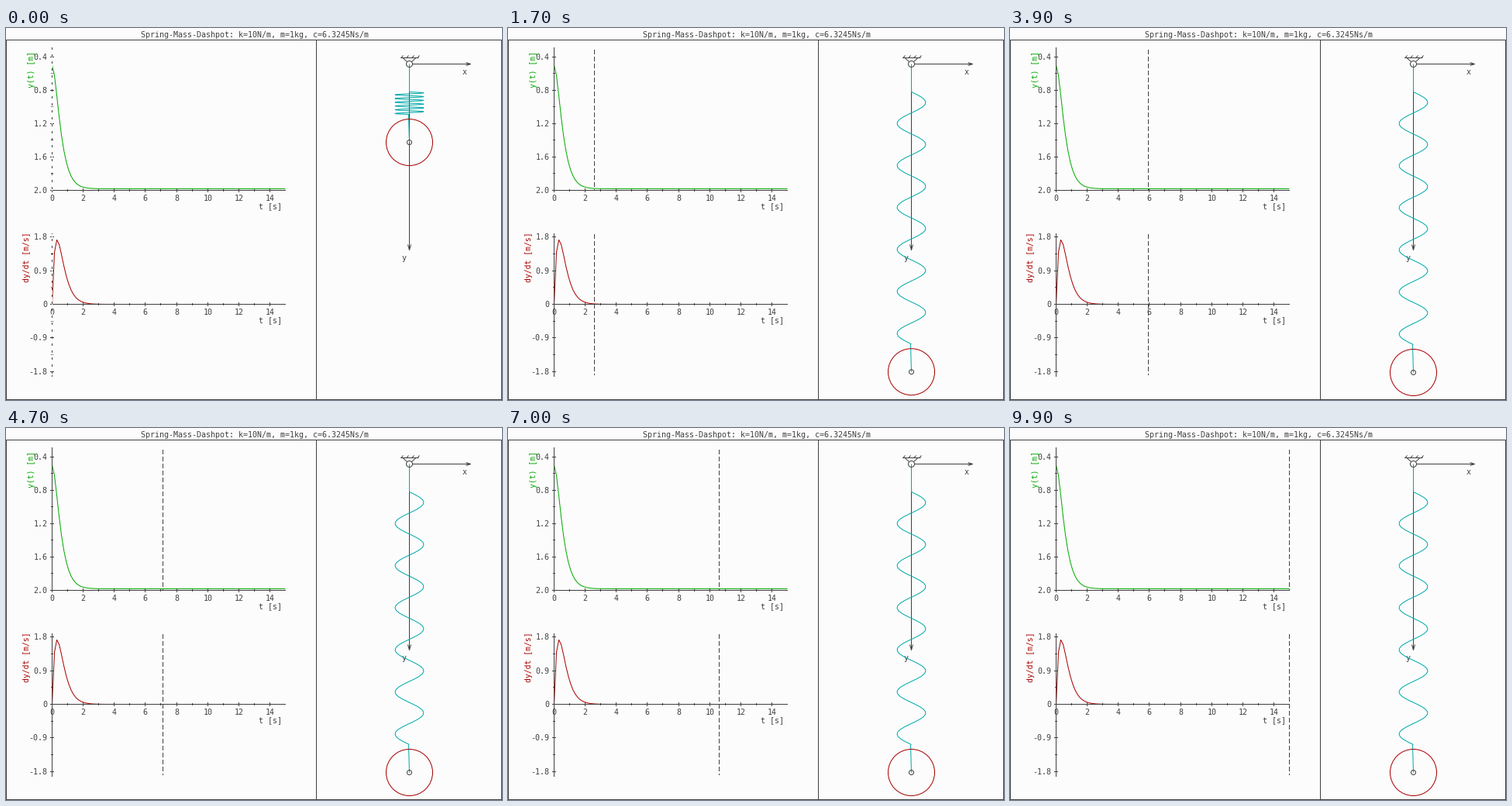
Recreate the animation shown at these times as a matplotlib script. Size 640 px wide and 480 px high, loop 10000 ms.

```python
import numpy as np
import matplotlib.pyplot as plt
from matplotlib.animation import FuncAnimation
from matplotlib.patches import Circle

W, H, DPI = 640, 480, 80
PX = 72 / DPI                       # one pixel in points
FRAMES, INTERVAL, T_END = 100, 100, 15.0

BG, INK, GREEN, RED, CYAN = "#fcfcfc", "#404040", "#00a800", "#a80000", "#00a8a8"

plt.rcParams.update({
    "font.family": "DejaVu Sans Mono",
    "toolbar": "None",
    "path.snap": False,             # coordinates are already on pixel centres
})

# Critically damped oscillator
M, K, G, L0, Y0 = 1.0, 10.0, 9.81, 1.0, 0.5
OMEGA = np.sqrt(K / M)
Y_END = L0 + M * G / K


def position(t):
    return Y_END + (Y0 - Y_END) * (1 + OMEGA * t) * np.exp(-OMEGA * t)


def velocity(t):
    return (Y_END - Y0) * OMEGA**2 * t * np.exp(-OMEGA * t)


fig = plt.figure(figsize=(W / DPI, H / DPI), dpi=DPI, facecolor=BG)
ax = fig.add_axes([0, 0, 1, 1])
ax.set_xlim(-0.5, W - 0.5)          # whole numbers are pixel centres
ax.set_ylim(H - 0.5, -0.5)
ax.axis("off")


def line(xs, ys, color=INK, z=2, **kw):
    return ax.plot(xs, ys, color=color, lw=PX, zorder=z,
                   solid_capstyle="butt", **kw)[0]


def ring(x, y, r, color=INK, z=5):
    return ax.add_patch(Circle((x, y), r, fill=False, ec=color, lw=PX, zorder=z))


def label(x, y, s, ha="center"):
    ax.text(x, y + 3.5, s, ha=ha, va="baseline", color=INK,
            fontsize=10 * PX, zorder=3)


def side_label(x, y, s, color):
    ax.text(x, y, s, rotation=90, ha="center", va="center", color=color,
            fontsize=9.8 * PX, zorder=3)


# Plots
X0, X1 = 59, 360


def time_px(t):
    return X0 + (X1 - X0) * t / T_END


def dist_px(y):
    return 209 + (y - 2.0) * 107.8


def speed_px(v):
    return 356 - v * 48.3


def time_axis(y):
    line([X0, X1 + 0.5], [y, y])
    for s in range(15):
        x = round(time_px(s))
        size = 1.5 if s % 2 else 2.5
        line([x, x], [y - size, y + size])
        if s % 2 == 0:
            label(x, y + 10, str(s))
    label(340, y + 20, "t [s]")


def value_axis(top, bottom, values, to_px):
    line([X0, X0], [top, bottom])
    for n, v in enumerate(values):
        y = round(to_px(v))
        size = 1.5 if n % 2 else 2.5
        line([X0 - size, X0 + size], [y, y])
        if n % 2 == 0:
            label(53, y, f"{v:.1f}" if abs(v) > 1e-9 else "0", ha="right")


ts = np.linspace(0, T_END, FRAMES)

value_axis(24.5, 209.5, np.arange(9) * 0.2 + 0.4, dist_px)
time_axis(209)
side_label(33, 53, "y(t) [m]", GREEN)
line(time_px(ts), dist_px(position(ts)), GREEN, 1.5)

value_axis(264.5, 449.5, (np.arange(9) - 4) * -0.45, speed_px)
time_axis(356)
side_label(27, 295, "dy/dt [m/s]", RED)
line(time_px(ts), speed_px(velocity(ts)), RED, 1.5)

# Frame and title
line([0, 639, 639, 0, 0], [15, 15, 479, 479, 15])
line([400, 400], [15, 479])
label(320, 7.5, "Spring-Mass-Dashpot: k=10N/m, m=1kg, c=6.3245Ns/m")

# Support and coordinate axes
CX, CY = 520, 46
line([509, 532], [38, 38])
for x in range(509, 532, 7):
    line([x, x + 3], [38.5, 35])
line([512, CX - 3], [38.5, CY - 3])
line([528, CX + 3], [38.5, CY - 3])
ring(CX, CY, 4)
line([CX + 4, 599], [CY, CY])
line([593, 599, 593], [CY - 2, CY, CY + 2])
line([CX, CX], [CY + 4, 286])
line([CX - 2, CX, CX + 2], [279, 286, 279])
label(591, 55.5, "x")
label(512.5, 295.5, "y")

# Moving parts
TOP, COILS, AMP, ROD = 82, 6, 18.5, 36
line([CX, CX], [CY, TOP], CYAN, 4)
phase = np.linspace(0, 1, 101)
coil_x = CX + AMP * np.sin(2 * np.pi * COILS * phase)
spring = line([], [], CYAN, 4)
rod = line([], [], CYAN, 4)
mass = ring(CX, 0, 30, RED)
hub = ring(CX, 0, 3)
cursors = [(line([], [], z=6, dashes=(6, 3), dash_capstyle="butt"), span)
           for span in ((27.5, 209.5), (265.5, 447.5))]


def update(i):
    t = T_END * i / (FRAMES - 1)
    y = 46.8 + 200.5 * position(t)
    spring.set_data(coil_x, TOP + (y - ROD - TOP) * phase)
    rod.set_data([CX - 1, CX], [y - ROD, y])
    mass.center = hub.center = (CX, y)
    x = round(time_px(t))
    for cursor, span in cursors:
        cursor.set_data([x, x], span)
        # the cursor inverts what it covers, so it erases the value axis
        cursor.set_color(BG if i == 0 else INK)
    return [spring, rod, mass, hub] + [c for c, _ in cursors]


anim = FuncAnimation(fig, update, frames=FRAMES, interval=INTERVAL,
                     repeat=True, repeat_delay=0, blit=False)
plt.show()
```
